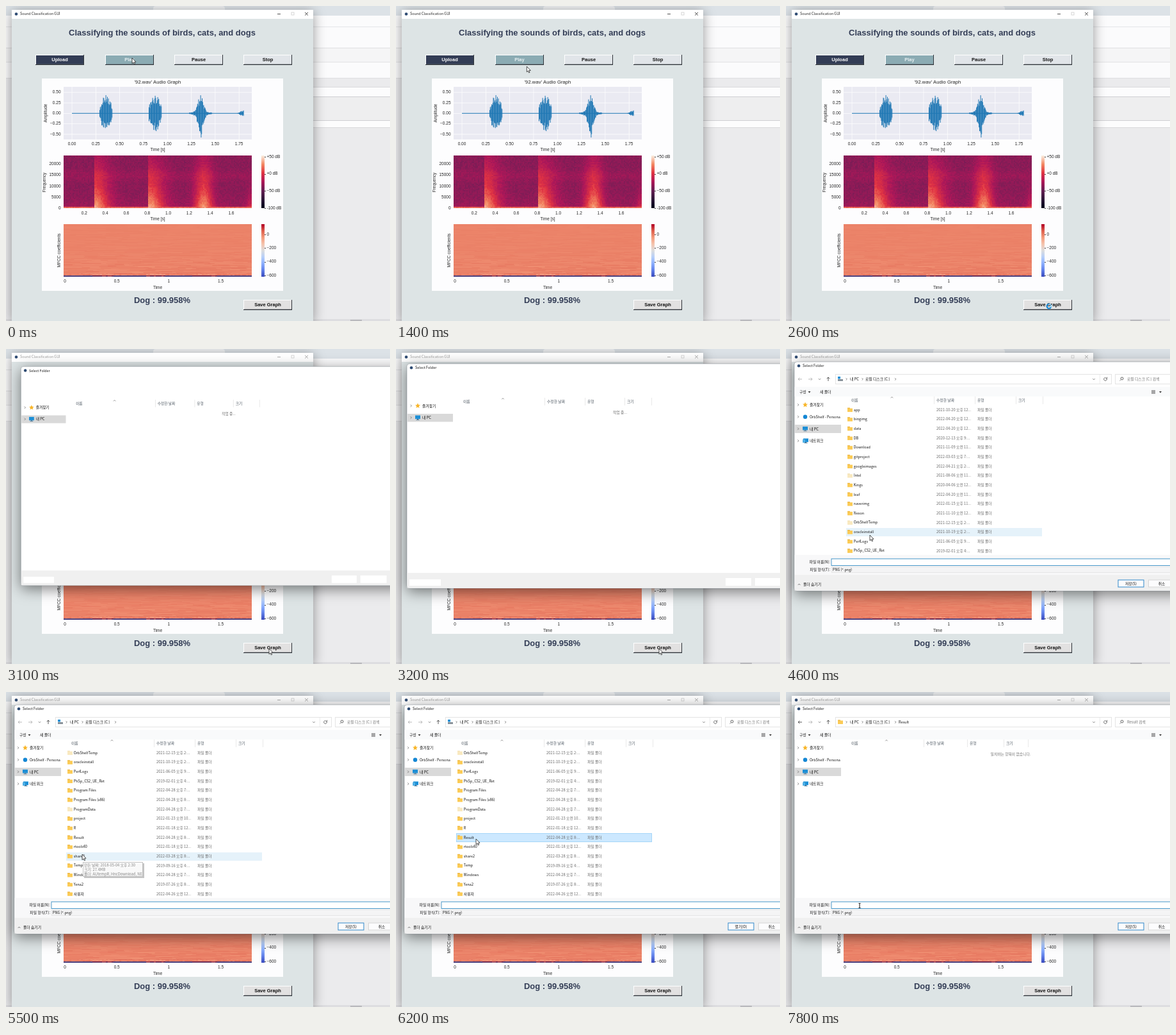
These frames come from a looping animation (600 px wide and 491 px high, 8000 ms). An HTML page with a canvas:

```html
<!DOCTYPE html>
<html lang="ko">
<head>
<meta charset="utf-8">
<title>Sound Classification GUI</title>
<style>
html, body { margin: 0; width: 600px; height: 491px; overflow: hidden; background: #ebebed; }
canvas { display: block; }
</style>
</head>
<body>
<canvas id="stage" width="600" height="491"></canvas>
<script>
const stage = document.getElementById('stage').getContext('2d');
let g = stage;

const UI = '"Noto Sans CJK KR", "Noto Sans CJK", "Noto Sans", sans-serif';
const ARIAL = '"Liberation Sans", Arial, sans-serif';
const NAVY = '#333d56';
const clamp = v => Math.max(0, Math.min(1, v));
const ease = p => p * p * (3 - 2 * p);

// ---- drawing helpers ----
function rect(x, y, w, h, fill, line) {
  if (fill) { g.fillStyle = fill; g.fillRect(x, y, w, h); }
  if (line) {
    g.strokeStyle = line; g.lineWidth = 1;
    g.strokeRect(x + .5, y + .5, w - 1, h - 1);
  }
}
function dot(x, y, r, fill) {
  g.fillStyle = fill;
  g.beginPath(); g.arc(x, y, r, 0, 7); g.fill();
}
function path(pts, color, width = .8) {
  g.strokeStyle = color; g.lineWidth = width;
  g.beginPath();
  pts.forEach(([x, y], i) => i ? g.lineTo(x, y) : g.moveTo(x, y));
  g.stroke();
}
// Small sizes are drawn large and scaled down to keep exact advance widths.
function text(s, x, y, size, color, { font = UI, bold = false, align = 'left', turn = 0 } = {}) {
  g.save();
  g.translate(x, y); g.rotate(turn); g.scale(.1, .1);
  g.font = `${bold ? 'bold ' : ''}${size * 10}px ${font}`;
  g.textAlign = align; g.textBaseline = 'middle'; g.fillStyle = color;
  g.fillText(s, 0, 0);
  g.restore();
}
const ui = (s, x, y, color = '#111', align = 'left') =>
  text(s, x, y, /[가-힣]/.test(s) ? 5.8 : 5.5, color, { align });
const plotText = (s, x, y, align = 'center', size = 6.5, turn = 0) =>
  text(s, x, y, size, '#262626', { font: ARIAL, align, turn });
const bold = (s, x, y, size, color) => text(s, x, y, size, color, { font: ARIAL, bold: true, align: 'center' });

function chevron(x, y, dir, color = '#666', r = 1.7) {
  const a = { right: 0, down: Math.PI / 2, up: -Math.PI / 2 }[dir];
  g.save(); g.translate(x, y); g.rotate(a);
  path([[-r / 2, -r], [r / 2, 0], [-r / 2, r]], color);
  g.restore();
}
function triangle(x, y) {
  g.fillStyle = '#333';
  g.beginPath(); g.moveTo(x - 2, y - 1); g.lineTo(x + 2, y - 1); g.lineTo(x, y + 1.4); g.fill();
}
function rng(seed) {
  return () => (seed = (seed * 16807) % 2147483647) / 2147483647;
}
function ramp(...hex) {
  const stops = hex.map(h => [1, 3, 5].map(i => parseInt(h.slice(i, i + 2), 16)));
  return v => {
    const f = clamp(v) * (stops.length - 1), i = Math.min(Math.floor(f), stops.length - 2);
    return `rgb(${stops[i].map((c, k) => Math.round(c + (stops[i + 1][k] - c) * (f - i)))})`;
  };
}
const rocket = ramp('#03051a', '#2f1839', '#661f54', '#ad1759', '#df3243', '#f38660', '#faebdd');
const coolwarm = ramp('#3b4cc0', '#6282ea', '#8db0fe', '#b8d0f9', '#dddddd', '#f5c4ad', '#f49a7b', '#de604d', '#b40426');

// ---- desktop and main window ----
function desktop() {
  rect(0, 0, 600, 491, '#ebebed');
  rect(0, 0, 600, 15, '#dce2e7');
  rect(0, 15, 600, 97, '#fbfbfc');
  rect(0, 32, 600, 1, '#e4e5e8');
  rect(0, 65, 600, 23, '#f5f5f6');
  rect(0, 65, 600, 1, '#e0e0e2');
  rect(0, 87, 600, 1, '#e2e2e4');
  rect(0, 112, 600, 1, '#dedee1');
  rect(480, 126, 120, 64, '#fcfcfd');
  rect(480, 126, 120, 1, '#d9d9dc');
  rect(470, 141, 140, 38, '#eeeeef', '#cfcfd3');
  rect(480, 189, 120, 1, '#d9d9dc');
  rect(0, 488, 600, 3, '#dddde0');
  rect(538, 489, 18, 2, '#b9b9bd');
  g.fillStyle = '#f0f2f4';
  g.beginPath(); g.roundRect(230, 0, 112, 12, 4); g.fill();
}
function button(label, x, y, h, fill, color) {
  rect(x, y, 76, h, fill);
  rect(x, y, 76, 1, '#ffffff'); rect(x, y, 1, h, '#ffffff');
  rect(x, y + h - 1, 76, 1, '#30343a'); rect(x + 75, y, 1, h, '#30343a');
  rect(x + 1, y + h - 2, 74, 1, 'rgba(90,95,100,.45)');
  bold(label, x + 38, y + h / 2, 7.5, color);
}
function waveform() {
  rect(90, 126, 294, 82, '#eaeaf2');
  for (let i = 0; i < 8; i++) {
    const x = 103 + i * 37.3;
    g.fillStyle = '#fff'; g.fillRect(x - .3, 126, .7, 82);
    plotText((i / 4).toFixed(2), x, 215.5);
  }
  for (let i = -2; i < 3; i++) {
    const y = 167.3 - i * 16.3;
    g.fillStyle = '#fff'; g.fillRect(90, y - .3, 294, .7);
    plotText((i / 4).toFixed(2).replace('-', '−'), 85.5, y, 'right');
  }
  const rand = rng(92), bursts = [
    [146, 166, x => 31 * Math.exp(-(((x - 156) / 10) ** 2))],
    [223, 243, x => 32 * Math.exp(-(((x - 232.5) / 10) ** 2))],
    [286, 322, x => 25 * Math.exp(-(((x - 303.5) / 6.5) ** 2)) + 14 * Math.exp(-(((x - 304) / 2) ** 2)) + 1.5],
    [361, 371, x => 5 * Math.exp(-(((x - 369) / 5) ** 2))]
  ];
  path([[103, 167.3], [371, 167.3]], '#1f77b4', 1);
  for (const [a, b, amp] of bursts)
    for (let x = a; x < b; x += .8) {
      const up = amp(x) * (.45 + .55 * rand()), down = amp(x) * (.42 + .55 * rand());
      g.fillStyle = '#1f77b4'; g.fillRect(x, 167.3 - up, 1, up + down);
    }
  plotText("'92.wav' Audio Graph", 237, 118.7, 'center', 7.7);
  plotText('Time [s]', 237, 224.5);
  plotText('Amplitude', 62, 167, 'center', 6.5, -Math.PI / 2);
}
function spectrogram() {
  const rand = rng(7);
  const attack = (x, s, w) => x < s ? 0 : Math.exp(-(((x - s) / w) ** 2));
  for (let x = 90; x < 384; x += 2)
    for (let y = 233; y < 315; y += 2) {
      const u = (315 - y) / 82, low = 1 - u;
      const hit = Math.max(attack(x, 137, 23), attack(x, 222, 24), .95 * Math.exp(-(((x - 308) / 14) ** 2)));
      let v = .415 + .04 * Math.exp(-(((u - .63) / .1) ** 2)) + .06 * low ** 6;
      v += hit * (.09 + .35 * low ** 1.25);
      v += .22 * low ** 3 * Math.exp(-(((x - 385) / 9) ** 2));
      if (y > 312) v = Math.max(v, .76);
      g.fillStyle = rocket(v + (rand() - .5) * .06);
      g.fillRect(x, y, 2, 2);
    }
  for (let i = 0; i < 5; i++) plotText(String(i * 5000), 85.5, 315 - i * 17.1, 'right');
  for (let i = 1; i < 9; i++) plotText((i / 5).toFixed(1), 89.5 + i * 32.8, 323);
  plotText('Time [s]', 237, 332);
  plotText('Frequency', 60.5, 275, 'center', 6.5, -Math.PI / 2);
  colorbar(233, rocket, ['+50 dB', '+0 dB', '−50 dB', '-100 dB'], 235, 26.7);
}
function colorbar(top, map, labels, first, gap) {
  for (let i = 0; i < 82; i++) rect(399, top + i, 5, 1, map(1 - i / 81));
  labels.forEach((s, i) => {
    rect(404, Math.round(first + i * gap), 2, 1, '#444');
    plotText(s, 407.5, first + i * gap, 'left');
  });
}
function mfcc() {
  const rand = rng(31);
  rect(90, 340, 294, 82, coolwarm(.8));
  for (let y = 340; y < 417; y++)
    for (let x = 90; x < 384;) {
      const w = Math.min(6 + rand() * 34, 384 - x), depth = (y - 340) / 77;
      g.fillStyle = coolwarm(.8 + (rand() - .5) * (.012 + .05 * depth ** 3));
      g.fillRect(x, y, w, 1); x += w;
    }
  for (let x = 90; x < 384; x += 3) {
    const loud = (x > 134 && x < 168) || (x > 217 && x < 247) || (x > 290 && x < 328);
    rect(x, 417, 3, 1, coolwarm(.78 + rand() * .05));
    rect(x, 418, 3, 1, coolwarm(loud ? .65 + rand() * .12 : .84));
    rect(x, 419, 3, 1, coolwarm(loud ? .88 : .72 + rand() * .1));
    rect(x, 420, 3, 2, loud ? (rand() < .45 ? '#a0586c' : '#6f3d66') : '#493a78');
  }
  for (let i = 0; i < 4; i++) plotText(i % 2 ? (i / 2).toFixed(1) : String(i / 2), 92 + i * 81.2, 429);
  plotText('Time', 237, 439);
  plotText('MFCC coefficients', 83, 381, 'center', 6.5, -Math.PI / 2);
  colorbar(340, coolwarm, ['0', '−200', '−400', '−600'], 356, 21.3);
}
function mainWindow() {
  g.save();
  g.shadowColor = 'rgba(0,0,0,.4)'; g.shadowBlur = 18; g.shadowOffsetY = 3;
  rect(9, 6, 471, 485, '#dde4e5');
  g.restore();
  rect(9, 6, 471, 14, '#ffffff');
  dot(16, 12.5, 2.3, '#2d4a72');
  bold('Classifying the sounds of birds, cats, and dogs', 244, 42, 13, NAVY);
  button('Upload', 46, 76, 16, NAVY, '#ffffff');
  button('Play', 155, 76, 16, '#8babb3', '#e9f1f3');
  button('Pause', 263, 76, 16, '#e1e5e9', '#111');
  button('Stop', 371, 76, 16, '#e1e5e9', '#111');
  rect(56, 113, 377, 331, '#fdfdfe');
  waveform(); spectrogram(); mfcc();
  bold('Dog : 99.958%', 244, 459.5, 13, NAVY);
  button('Save Graph', 371, 458, 16, '#e2e1e1', '#111');
}
const backdrop = document.createElement('canvas');
backdrop.width = 600; backdrop.height = 491;
g = backdrop.getContext('2d');
desktop(); mainWindow();
g = stage;

function titleBar(active) {
  const c = active ? '#222' : '#999';
  ui('Sound Classification GUI', 22, 12.3, c);
  path([[424, 12.5], [429, 12.5]], c);
  g.strokeStyle = '#ccc'; g.strokeRect(446, 10, 4, 4);
  path([[467, 9.8], [472, 14.6]], c);
  path([[472, 9.8], [467, 14.6]], c);
}

// ---- save dialog ----
const files = ('app:211020p12 bingimg:220420p12 data:220420p12 DB:201213p9 Download:211109a11 ' +
  'gitproject:220303p7 googleimages:220421p2 Intel:210806a11 Kings:200406a12 leaf:220420a11 ' +
  'naverimg:220115p11 Nexon:211110a12 OrbShelfTemp:211215p2 oracleinstall:211019p2 PerfLogs:210605p9 ' +
  'PhSp_CS2_UE_Ret:190201p4 Program_Files:220428p7 Program_Files_(x86):220428p8 ProgramData:220428p7 ' +
  'project:220123a10 R:220118p12 Result:220428p8 rtools40:220118p12 share2:220328p8 Temp:190916p4 ' +
  'Windows:220428p7 Yena2:190726p8 사용자:220426a12').split(' ').map(entry => {
    const [name, d] = entry.split(':'), hour = d.slice(7);
    return {
      name: name.startsWith('Program_') ? name.replaceAll('_', ' ') : name,
      pale: /^(Intel|OrbShelfTemp|ProgramData)$/.test(name),
      date: `20${d.slice(0, 2)}-${d.slice(2, 4)}-${d.slice(4, 6)} ${d[6] === 'a' ? '오전' : '오후'} ${hour}${hour[1] ? '' : ':'}...`
    };
  });
const PITCH = 14.65;

function folder(x, y, pale) {
  rect(x, y - 3, 4, 2, pale ? '#f3dfae' : '#e9ae36');
  rect(x, y - 2, 8, 5.5, pale ? '#f9e9c0' : '#fbcb56');
}
function monitor(x, y) {
  rect(x - 4, y - 3.5, 8, 5.5, '#1d8fd6');
  rect(x - 1, y + 2, 2, 1, '#3a6a8c'); rect(x - 2.5, y + 3, 5, .8, '#3a6a8c');
}
function star(x, y) {
  g.fillStyle = '#f8b62b';
  g.beginPath();
  for (let i = 0; i < 10; i++) {
    const a = i * Math.PI / 5 - Math.PI / 2, r = i % 2 ? 2 : 4.2;
    g.lineTo(x + r * Math.cos(a), y + r * Math.sin(a));
  }
  g.fill();
}
function shell(x, y, h) {
  g.save();
  g.shadowColor = 'rgba(0,0,0,.5)'; g.shadowBlur = 22; g.shadowOffsetY = 5;
  g.fillStyle = '#fff';
  g.beginPath(); g.roundRect(x, y, 640, h, 4); g.fill();
  g.restore();
  g.strokeStyle = 'rgba(90,100,110,.5)'; g.lineWidth = .7; g.stroke();
  dot(x + 7, y + 6.3, 2.3, '#2d4a72');
  ui('Select Folder', x + 13, y + 6.3);
}
function header(xs, y, sortX) {
  ['이름', '수정한 날짜', '유형', '크기'].forEach((s, i) => ui(s, xs[i], y, '#4c5660'));
  xs.slice(1).forEach((x, i) => rect(Math.round(x) - (i < 3 ? 4 : 1), y - 6, 1, 12, '#e9e9e9'));
  chevron(sortX, y - 4.5, 'up', '#777');
}
function skeleton() {
  shell(17, 23, 350);
  header([105, 236, 299, 361, 400], 82, 167);
  chevron(23.5, 88.5, 'right'); star(34, 88.5); ui('즐겨찾기', 41, 88.3);
  rect(18, 101, 71, 12.5, '#d9d9d9');
  chevron(23.5, 107, 'right'); monitor(34, 107); ui('내 PC', 41, 107);
  ui('작업 중...', 339, 98.5, '#666');
  rect(17.5, 349, 640, 23.5, '#f0f0f0');
  rect(21, 359, 49, 10, '#fff');
  rect(515, 357, 40, 12, '#fff'); rect(561, 357, 42, 12, '#fff');
}
function navArrow(x, dx, dy, color) {
  path([[x - 3 * dx, 47 - 3 * dy], [x + 3 * dx, 47 + 3 * dy]], color);
  for (const s of [-1, 1])
    path([[x + 3 * dx, 47 + 3 * dy], [x + .6 * dx + 2.2 * s * dy, 47 + .6 * dy + 2.2 * s * dx]], color);
}
function toolbar(inside) {
  navArrow(22, -1, 0, inside ? '#333' : '#aaa');
  navArrow(38, 1, 0, '#aaa');
  chevron(52.5, 47, 'down');
  navArrow(66, 0, -1, '#333');
  rect(77, 39, 432, 16, '#fff', '#e4e4e4');
  if (inside) folder(81, 46.5);
  else { rect(81, 47, 8, 3, '#8a939b'); rect(81, 43, 4, 3.5, '#1d8fd6'); }
  chevron(94.5, 47, 'right'); ui('내 PC', 100, 46.7);
  chevron(119.5, 47, 'right'); ui('로컬 디스크 (C:)', 124, 46.7);
  chevron(171, 47, 'right');
  if (inside) ui('Result', 176, 46.7);
  chevron(481, 47, 'down');
  rect(490, 40, 1, 14, '#ececec');
  g.strokeStyle = '#555'; g.lineWidth = .8;
  g.beginPath(); g.arc(499, 47, 2.4, -.4, 5); g.stroke();
  path([[501.6, 43.8], [501.4, 46], [499.4, 45.8]], '#555');
  rect(514, 39, 100, 16, '#fff', '#e4e4e4');
  g.strokeStyle = '#666';
  g.beginPath(); g.arc(525, 46, 2, 0, 7); g.stroke();
  path([[523.5, 47.6], [521.5, 49.6]], '#666');
  ui(inside ? 'Result 검색' : '로컬 디스크 (C:) 검색', 533, 46.7, '#707070');
  rect(13.5, 59, 590, 15, '#f9fafb');
  ui('구성', 21, 67); triangle(36.5, 67);
  ui('새 폴더', 53, 67);
  for (let i = 0; i < 3; i++) rect(571, 64.5 + i * 2, 6, 1, '#555');
  triangle(585, 67);
}
function sidebar() {
  rect(13.5, 118, 72.5, 13, '#d9d9d9');
  ['즐겨찾기', 'OrbShelf - Persona', '내 PC', '네트워크'].forEach((s, i) => {
    const y = 87 + i * 18.7;
    chevron(19, y, 'right'); ui(s, 37, y);
  });
  star(30, 87);
  dot(30, 105.7, 3.2, '#1487d4');
  monitor(30, 124.4);
  monitor(31, 143); rect(26, 141, 4, 5, '#4fb0e6');
}
function list(scroll, hover, picked) {
  g.save();
  g.beginPath(); g.rect(86, 87, 514, 234); g.clip();
  files.forEach((f, i) => {
    const y = 94.6 + (i - scroll) * PITCH;
    if (y < 85 || y > 322) return;
    if (i === picked) rect(94, Math.round(y - 6), 306, 14, '#cce8ff', '#a6d6f8');
    else if (i === hover) rect(94, Math.round(y - 6), 306, 13, '#e5f2fa');
    folder(96, y, f.pale);
    ui(f.name, 105.8, y);
    ui(f.date, 235, y, '#666');
    ui('파일 폴더', 299, y, '#666');
  });
  g.restore();
}
function footer(action, focus) {
  rect(13.5, 321, 590, 31, '#f8f8f9');
  rect(13.5, 352, 590, 24.5, '#f0f0f0');
  ui('파일 이름(N):', 69, 331.8, '#111', 'right');
  ui('파일 형식(T):', 69, 343.8, '#111', 'right');
  const mix = (a, b) => Math.round(a + (b - a) * focus);
  rect(70.5, 326.5, 540, 11.5, '#fff', `rgb(${mix(190, 70)},${mix(190, 150)},${mix(190, 200)})`);
  rect(71, 339, 540, 10, '#f4f4f5', '#e6e6e6');
  ui('PNG (*.png)', 73, 343.8);
  chevron(20.5, 367, 'up', '#444'); ui('폴더 숨기기', 27, 366.8);
  rect(518.5, 359.5, 41, 12, '#fcfcfd', '#2f86c8');
  ui(action, 539, 365.4, '#111', 'center');
  rect(566, 359.5, 42, 12, '#fcfcfd', '#d4d4d4');
  ui('취소', 587, 365.4, '#111', 'center');
}
function tooltip(alpha) {
  g.save(); g.globalAlpha = alpha;
  rect(122, 267, 94, 23, 'rgba(0,0,0,.25)');
  rect(120, 265, 94, 23, '#fff', '#bbb');
  g.beginPath(); g.rect(120, 265, 93, 23); g.clip();
  ['만든 날짜: 2018-05-04 오후 2:30', '크기: 27.4MB', '폴더: AUtempR, HncDownload, NEC'].forEach((s, i) =>
    ui(s, 122, 269.3 + i * 7.1, '#777'));
  g.restore();
}
function dialog(t, [x, y]) {
  if (t < 3500) {
    const k = t < 3200 ? 1 - (3200 - t) * .00025 : 1 + Math.min(t - 3200, 200) * .00009;
    g.save();
    g.globalAlpha = clamp((t - 2800) / 300);
    g.translate(270, 198); g.scale(k, k); g.translate(-270, -198);
    skeleton();
    g.restore();
    return;
  }
  const inside = t >= 6300;
  shell(13, 20, 357);
  toolbar(inside); sidebar();
  if (inside) {
    header([102, 219, 287, 344, 379], 80, 157);
    ui('일치하는 항목이 없습니다.', 351, 97, '#707070', 'center');
  } else {
    header([102, 235, 299, 363, 402], 80, 165.5);
    if (t < 3800) ui('작업 중...', 339, 97, '#666');
    else {
      const scroll = 3 * Math.max(0, Math.min(4, (t - 4600) / 100));
      const over = x > 94 && x < 400 && y > 87 && y < 321;
      const hover = over ? Math.round((y + 2 - 94.6) / PITCH + scroll) : -1;
      list(scroll, hover, t >= 6200 ? 21 : -1);
    }
  }
  footer(t === 6200 ? '열기(O)' : '저장(S)', inside ? clamp((t - 7200) / 300) : 1);
  if (t >= 7300 && t < 7800) rect(72, 328, 1, 8, '#222');
  if (t === 5400 || t === 5500) tooltip(t === 5400 ? .4 : .9);
}

// ---- pointer ----
const moves = [
  [1400, 2200, 411, 467], [3800, 4600, 131, 290], [4700, 5100, 119, 253],
  [5600, 6100, 125, 229], [6600, 7000, 115, 333]
];
function pointerAt(t) {
  let x = 197, y = 81;
  for (const [a, b, tx, ty] of moves) {
    const p = ease(clamp((t - a + 100) / (b - a + 100)));
    x += (tx - x) * p; y += (ty - y) * p;
  }
  return [x, y];
}
function pointer(t, [x, y]) {
  if (t === 2600) {
    g.lineWidth = 2;
    g.strokeStyle = '#8fd0f5';
    g.beginPath(); g.arc(411, 468, 3.4, 0, 7); g.stroke();
    g.strokeStyle = '#1583d0';
    g.beginPath(); g.arc(411, 468, 3.4, .6, 4.6); g.stroke();
    return;
  }
  if (t > 6300 && y > 327) {
    path([[x, y - 3.5], [x, y + 3.5]], '#111', 1);
    for (const d of [-3.5, 3.5]) path([[x - 1.6, y + d], [x + 1.6, y + d]], '#111');
    return;
  }
  g.save(); g.translate(x, y);
  g.beginPath();
  [[0, 0], [0, 8.6], [2, 6.9], [3.3, 9.8], [4.7, 9.2], [3.4, 6.4], [6, 6.2]].forEach(p => g.lineTo(...p));
  g.closePath();
  g.fillStyle = '#fff'; g.fill();
  g.strokeStyle = '#222'; g.lineWidth = .8; g.stroke();
  g.restore();
}

function draw(t) {
  const at = pointerAt(t);
  g.drawImage(backdrop, 0, 0);
  titleBar(t < 2900);
  if (t >= 2900) dialog(t, at);
  pointer(t, at);
}
let start;
function tick(now) {
  start ??= now;
  draw(Math.floor((now - start) % 8000 / 100) * 100);
  requestAnimationFrame(tick);
}
draw(0);
requestAnimationFrame(tick);
</script>
</body>
</html>
```
